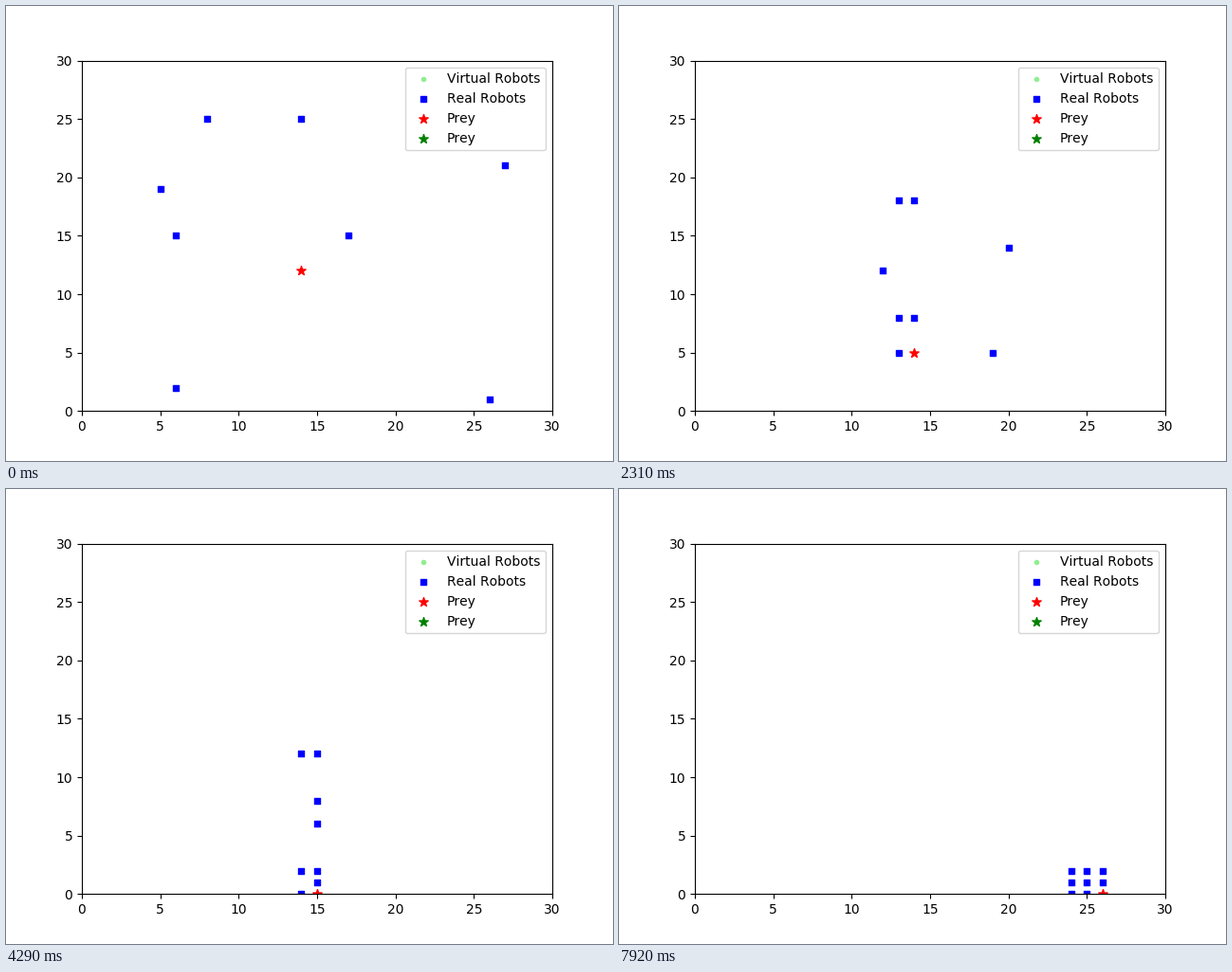
Animation of 640x480 px, one loop 8000 ms. Source, as a matplotlib script:

```python
from itertools import product

import matplotlib.pyplot as plt
from matplotlib.animation import FuncAnimation

LOOP, TICK, STEP = 8000, 40, 330

# Starting cells, in the order in which the robots take their turns
STARTS = [(17, 15), (5, 19), (6, 15), (6, 2),
          (26, 1), (27, 21), (14, 25), (8, 25)]


def prey_cell(step):
    """Down to the wall, then along it to the right."""
    return 14 + max(0, step - 12), max(0, 12 - step)


def chase(cell, prey, taken):
    """Free neighbouring cell nearest to the prey; ties go up, then left."""
    x, y = cell
    free = [(x + dx, y + dy) for dx, dy in product((-1, 0, 1), repeat=2)
            if (x + dx, y + dy) not in taken]

    def rank(c):
        return (c[0] - prey[0]) ** 2 + (c[1] - prey[1]) ** 2, -c[1], c[0]

    return min(free, key=rank)


def hunt(steps):
    """Robot cells at every step; robots move one after another."""
    cells = list(STARTS)
    history = [list(cells)]
    for step in range(1, steps):
        prey = prey_cell(step)
        for i, cell in enumerate(cells):
            others = cells[:i] + cells[i + 1:]
            cells[i] = chase(cell, prey, {prey, *others})
        history.append(list(cells))
    return history


HISTORY = hunt(LOOP // STEP + 1)

plt.rcParams["text.kerning_factor"] = 6
fig, ax = plt.subplots(figsize=(6.4, 4.8), dpi=100)
ax.set_xlim(0, 30)
ax.set_ylim(0, 30)

ax.scatter([], [], s=36, c="lightgreen", marker=".", label="Virtual Robots")
robots = ax.scatter([], [], s=20, c="blue", marker="s", label="Real Robots")
prey_mark = ax.scatter([], [], s=50, c="red", marker="*", label="Prey")
ax.scatter([], [], s=50, c="green", marker="*", label="Prey")
ax.legend(loc="upper right")


def update(frame):
    step = (frame * TICK + TICK - 10) // STEP
    robots.set_offsets(HISTORY[step])
    prey_mark.set_offsets([prey_cell(step)])
    return robots, prey_mark


anim = FuncAnimation(fig, update, frames=LOOP // TICK, interval=TICK,
                     repeat=True, repeat_delay=0)
plt.show()
```
